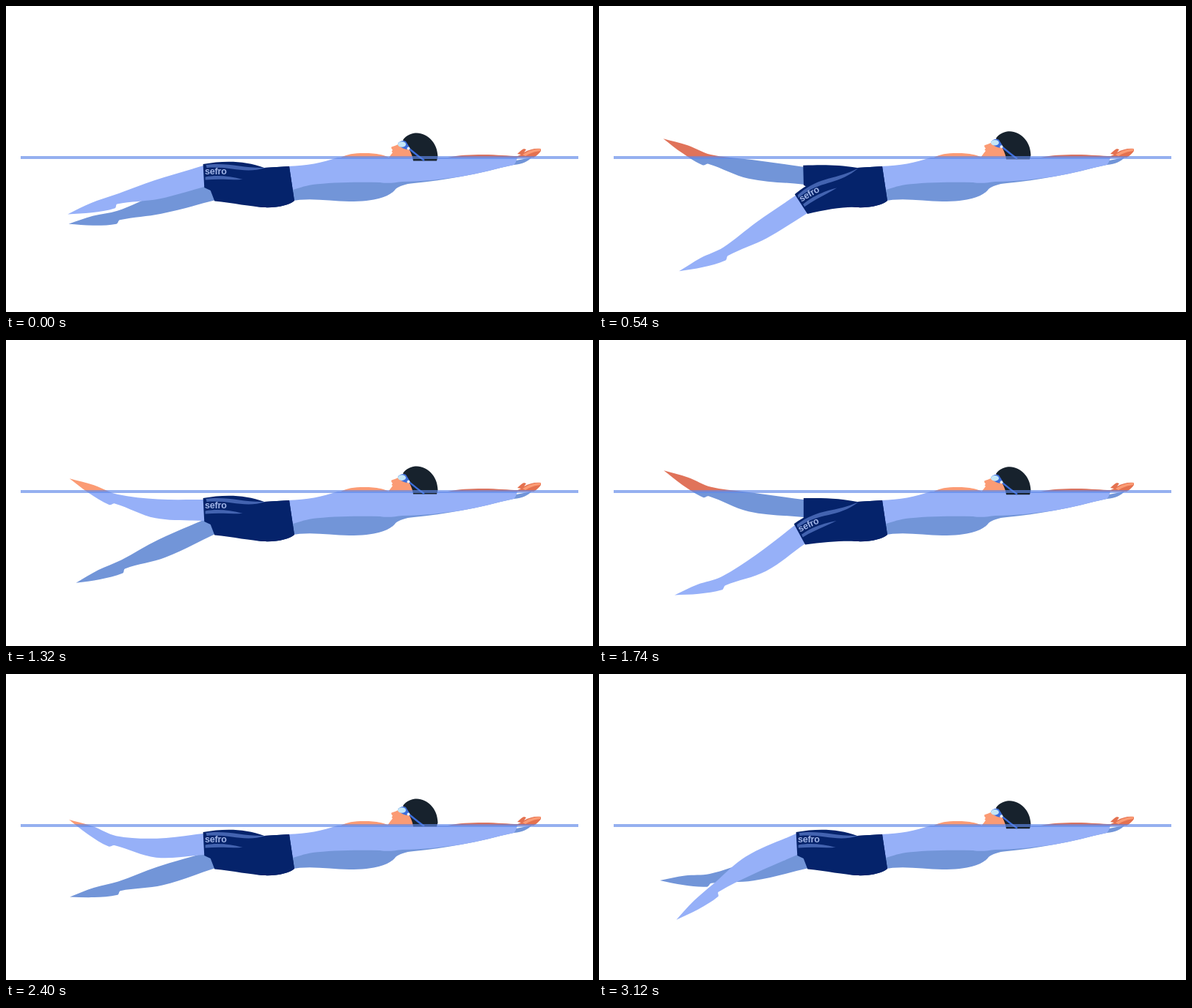
Write an HTML page that moves like this. It is 800 px wide and 418 px high and loops after 3.24 s.

```html
<!DOCTYPE html>
<html lang="en">
<head>
<meta charset="utf-8">
<title>Backstroke kick</title>
<style>
  html, body { margin: 0; width: 100%; height: 100%; overflow: hidden; background: #fff; }
  svg { display: block; width: 100%; height: 100%; }
  .near { fill: #96b0f8; }
  .far { fill: #7295d8; }
  .dry .near { fill: #fb9b74; }
  .dry .far { fill: #e0735a; }
  text { font: bold 12.5px "Liberation Sans", Arial, sans-serif; letter-spacing: -.2px; fill: #a3b6e8; }
</style>
</head>
<body>
<svg viewBox="0 0 800 418">
  <defs>
    <clipPath id="air"><path d="M0 0H800V207H0Z"/></clipPath>
    <clipPath id="water"><path d="M0 207H800V418H0Z"/></clipPath>
    <path id="nearLeg"/>
    <path id="farLeg"/>
  </defs>

  <g class="dry" clip-path="url(#air)">
    <use href="#farLeg" class="far"/>
    <use href="#nearLeg" class="near"/>
    <path class="near" d="M453 209C462 203 472 201 488 201C504 201 514 203 524 208Z"/>
    <path fill="#d9735f" d="M595 209C610 204 630 203 650 203C670 203 685 205 698 205L698 209Z"/>
    <path fill="#e4714f" d="M688 209L702 203L697 202C700 199 703 196 706 195L709 196L706 200C713 196 721 194 729 195L729 198C726 203 720 207 714 210Z"/>
    <path fill="#fb9b74" d="M704 203C711 198 720 195 729 195L728 198C720 199 712 202 708 205Z"/>
    <g class="head">
      <path class="near" d="M542 183C539 187 531 191 525.500 192.500C524.500 194 526 196 527 196.500L525.500 199L527 200C525 203 522 206 518 213H558L551 190Z"/>
    </g>
  </g>

  <g clip-path="url(#water)">
    <use href="#farLeg" class="far"/>
    <path class="far" d="M386 245C430 238 490 236 560 236L640 226L690 212L716 207C712 212 704 216 692 217C668 222 645 229 620 233C598 237 578 240 556 242C544 243 536 246 531 250C522 262 500 267 468 267C440 267 415 261 386 267Z"/>
    <path class="near" d="M384 219C412 218 432 214 455 206H697C696 211 695 214 692 217C668 222 645 229 620 233C598 236 568 240 540 240C530 241 522 243 510 241C476 240 440 241 418 244C406 246 398 249 388 252Z"/>
    <use href="#nearLeg" class="near"/>
  </g>

  <g fill="#05236b">
    <path id="farShorts"/>
    <path id="nearShorts"/>
  </g>
  <path id="band" fill="#4363b0"/>
  <g id="print">
    <text x="2.500" y="13.500">sefro</text>
    <path fill="#4363b0" d="M3 17.500C18 14.500 36 16 54 21C38 21.500 20 19.500 3 21.500Z"/>
  </g>

  <g class="head">
    <path fill="#17222d" d="M541 183C546 176 553 173.500 560 173.500C574 174 588 186 588.500 206L587 211.500H555C554 203 549 193 541 183Z"/>
    <path fill="none" stroke="#3d6edb" stroke-width="2.400" d="M546 192L552 197C558 202 563 206 570 211"/>
    <path fill="#3d6edb" d="M534 188C537 184 542 183 545 185L550 193L546 196C541 195 537 193 534 188Z"/>
    <ellipse cx="539.500" cy="189" rx="5.500" ry="3.800" fill="#c4e6f7"/>
    <circle cx="548.500" cy="194.500" r="2" fill="#e4edfb"/>
  </g>
  <path d="M20 207H780" stroke="#5f88e8" stroke-opacity=".66" stroke-width="4"/>
</svg>

<script>
const FRAME = 60, FRAMES = 54, TAU = 2 * Math.PI;
const HIP = [345, 240], THIGH = 140, SHIN = 57, FOOT = 69;

// Kick count reached at each frame; the tempo varies a little.
const tempo = [[0, 0], [9, .61], [14, .78], [22, 1.24], [29, 1.575], [40, 2.33], [45, 2.41], [52, 2.865], [54, 3]];

// Swing of each segment in degrees below level:
// mean, first harmonic and its peak, second harmonic and its peak.
const near = {
  thigh: [10, 14, .65, 5, .58], shin: [13, 27, .75], foot: [9, 34, .79],
  hem: [-6, 30, .62], reach: 76, lean: 9, half: 16
};
const far = {
  thigh: [8, 11, .11, 5, .31], shin: [6, 17, .11, 5, .29], foot: [1, 21, .13, 6, .29],
  hem: [12, -21, .58], reach: 67, lean: 9, half: 13.5
};

const wave = (t, [mean, a, p, b = 0, q = 0]) =>
  mean + a * Math.cos(TAU * (t - p)) + b * Math.cos(2 * TAU * (t - q));
const pulse = (t, [rest, size, peak]) => rest + size * Math.max(0, Math.cos(TAU * (t - peak))) ** 4;

function kickAt(frame) {
  const i = tempo.findIndex(([f]) => f > frame);
  const [f0, k0] = tempo[i - 1], [f1, k1] = tempo[i];
  return k0 + (k1 - k0) * (frame - f0) / (f1 - f0);
}

const add = (p, q, s = 1) => [p[0] + q[0] * s, p[1] + q[1] * s];
const mid = (p, q) => [(p[0] + q[0]) / 2, (p[1] + q[1]) / 2];
const dist = (p, q) => Math.hypot(q[0] - p[0], q[1] - p[1]);
const dir = (p, q) => {
  const len = dist(p, q) || 1;
  return [(q[0] - p[0]) / len, (q[1] - p[1]) / len];
};
const under = d => [d[1], -d[0]];
const fmt = p => p.map(v => v.toFixed(2)).join(" ");
const polar = deg => [-Math.cos(deg * TAU / 360), Math.sin(deg * TAU / 360)];

function pose(leg, kick) {
  const knee = add(HIP, polar(wave(kick, leg.thigh)), THIGH);
  const ankle = add(knee, polar(wave(kick, leg.shin)), SHIN);
  const toe = add(ankle, polar(wave(kick, leg.foot)), FOOT);
  const swing = pulse(kick, leg.hem), tilt = swing + leg.lean;
  const center = add(HIP, polar(swing), leg.reach);
  const across = under(polar(tilt));
  return { knee, ankle, toe, tilt, h1: add(center, across, -leg.half), h2: add(center, across, leg.half) };
}

// Smooth curve whose handles never outgrow their own segment.
function spline(pts) {
  const tangent = i => dir(pts[Math.max(i - 1, 0)], pts[Math.min(i + 1, pts.length - 1)]);
  return pts.slice(1).map((q, i) => {
    const grip = dist(pts[i], q) / 3;
    return `C${fmt(add(pts[i], tangent(i), grip))} ${fmt(add(q, tangent(i + 1), -grip))} ${fmt(q)}`;
  }).join("");
}

function legPath({ h1, h2, knee, ankle, toe }) {
  const hem = mid(h1, h2), across = dir(h1, h2);
  const kn = under(dir(hem, ankle));
  const an = under(dir(knee, ankle));
  const foot = dir(ankle, toe), sole = under(foot);
  const start = add(h1, across, 2), end = add(h2, across, -1);
  const instep = add(ankle, an, -6);
  const heel = add(add(ankle, foot, 5), sole, 11.5);
  const upper = [start, add(knee, kn, -13), instep, add(mid(instep, toe), sole, -2), toe];
  const lower = [toe, add(mid(heel, toe), sole, 2), heel, add(ankle, an, 7), add(knee, kn, 13), end];
  return `M${fmt(start)}${spline(upper)}${spline(lower)}L${fmt(add(hem, [14, 0]))}Z`;
}

function shortsPath({ h1, h2 }, bulge) {
  const drop = h1[1] - 216;
  const c1 = [h1[0] + 28, h1[1] - bulge - drop * .45];
  const c2 = [325, 216 - bulge + drop * .4];
  const c3 = [h2[0] + 25, (h2[1] + 272) / 2];
  return `M${fmt(h1)}C${fmt(c1)} ${fmt(c2)} 352 221L386 219L393 266` +
    `C386 272 370 276 350 275C335 274 ${fmt(c3)} ${fmt(h2)}Z`;
}

function bandPath({ h1 }) {
  const drop = h1[1] - 216, start = add(h1, [4, 1]);
  const c1 = add(start, [30, -4 - drop * .55]), c2 = [322, 222 + drop * .4];
  return `M${fmt(start)}C${fmt(c1)} ${fmt(c2)} 354 221` +
    `C${fmt(add(c2, [2, 8]))} ${fmt(add(c1, [2, 5]))} ${fmt(add(start, [1, 4]))}Z`;
}

const el = id => document.getElementById(id);
const setPath = (id, d) => el(id).setAttribute("d", d);
const heads = document.querySelectorAll(".head");

function draw(frame) {
  const kick = kickAt(frame), n = pose(near, kick), f = pose(far, kick);
  setPath("nearLeg", legPath(n));
  setPath("farLeg", legPath(f));
  setPath("nearShorts", shortsPath(n, 5));
  setPath("farShorts", shortsPath(f, 0));
  setPath("band", bandPath(n));
  el("print").setAttribute("transform", `translate(${fmt(n.h1)}) rotate(${3 - n.tilt})`);

  const bob = 1.5 * (Math.cos(2 * TAU * frame / FRAMES) - 1);
  heads.forEach(h => h.setAttribute("transform", `translate(0 ${bob})`));
}

const begin = performance.now();
function tick() {
  const time = (performance.now() - begin) % (FRAME * FRAMES);
  draw(Math.min(FRAMES - 2, Math.floor(time / FRAME)));
  requestAnimationFrame(tick);
}
tick();
</script>
</body>
</html>
```
